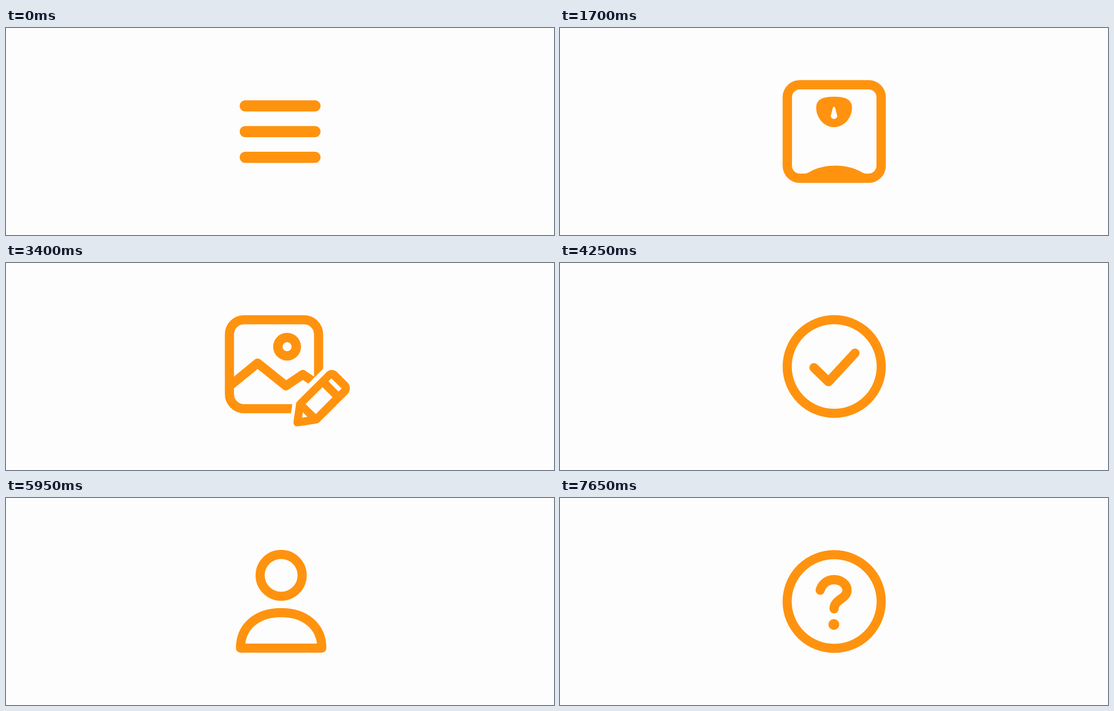
An HTML page with a canvas that plays this animation: 1200 px wide and 455 px high, repeating every 8000 ms.

```html
<!DOCTYPE html>
<html lang="en">
<head>
<meta charset="utf-8">
<title>Icons</title>
<style>
html, body { margin: 0; width: 100%; height: 100%; overflow: hidden; background: #fdfdfd; }
canvas { display: block; width: 1200px; height: 455px; }
</style>
</head>
<body>
<canvas id="stage" width="1200" height="455"></canvas>
<script>
const ctx = document.getElementById('stage').getContext('2d');
const INK = '#ff930f', PAPER = '#fdfdfd';
const STEP = 850, LOOP = 8000;

function line(d, width = 20, cap = 'round') {
  ctx.lineWidth = width;
  ctx.lineCap = cap;
  ctx.lineJoin = 'round';
  ctx.stroke(new Path2D(d));
}

function fill(d, color = INK) {
  ctx.fillStyle = color;
  ctx.fill(new Path2D(d));
}

function dot(x, y, r) {
  ctx.fillStyle = INK;
  ctx.beginPath();
  ctx.arc(x, y, r, 0, Math.PI * 2);
  ctx.fill();
}

function ring(x, y, r, width = 20) {
  ctx.lineWidth = width;
  ctx.beginPath();
  ctx.arc(x, y, r, 0, Math.PI * 2);
  ctx.stroke();
}

function frame(x, y, w, h, r, width = 20) {
  ctx.lineWidth = width;
  ctx.beginPath();
  ctx.roundRect(x, y, w, h, r);
  ctx.stroke();
}

function menu() {
  for (let i = 0; i < 3; i++) line(`M524 ${171.25 + i * 56.5}H676.5`, 24.5);
}

function hiddenEye() {
  line('M465 232C508 172 553 151 597.5 151S687 172 730 232C687 292 642 313 597.5 313S508 292 465 232Z');
  ring(597.5, 232, 34);
  line('M508 132L687 333');
}

function scale() {
  frame(497.75, 124.75, 205.5, 205.5, 27.5, 20.5);
  fill('M533 320.5Q541 320 547 316Q571 302.5 603 302.5T659 316Q665 320 673 320.5V325H533Z');
  fill('M600 151C590 151 582 152 576 154C566 157 561 165 561 175C561 198 579 218 600 218' +
       'S639.5 198 639.5 175C639.5 165 634 157 624 154C618 152 610 151 600 151Z');
  fill('M597.6 175Q600 171 602.4 175L607 193A7 7 0 1 1 593 193Z', PAPER);
}

function cross() {
  line('M523.5 151L674 301.5M674 151L523.5 301.5', 24);
}

function editImage() {
  frame(489.25, 124.75, 195.25, 195.5, 32);
  ring(615.5, 184, 20.25, 20.5);
  line('M489 271L551 220L613 270L650 245L684 268', 20, 'butt');
  fill('M705 222L628 299L627 310L622 345H705L765 260Z', PAPER);
  fill('M637 305L703 239Q712 231.5 723 238L749 264Q757 275 749 287L686 350Q683 352.5 679 353' +
       'L640 359Q628.5 360 629.5 349L635 311Q635.5 307 637 305Z');
  fill('M712.5 253.5L735 276L728 282.5L706 260Z', PAPER);
  fill('M693 273L715 295L678.5 332L656 310Z', PAPER);
  fill('M650 328L660 338L648.5 340Z', PAPER);
}

function check() {
  ring(600.5, 227.5, 103);
  line('M556 230L588 261L646 198');
}

function chevron() {
  line('M507.5 183.5L600.25 276L693 183.5', 24);
}

function person() {
  ring(602.5, 170, 46);
  line('M513.5 330C513.5 282 550 252 602.5 252S691.5 282 691.5 330Z');
}

function lock() {
  frame(513.5, 189.5, 177.5, 145, 32);
  line('M553.5 170V164A47 47 0 0 1 647.5 164V170', 20, 'butt');
  dot(602.3, 245, 13.2);
  line('M602.2 250V267', 16.5);
}

function help() {
  ring(600.4, 227.5, 103);
  line('M569.8 202.5C574 188 586 179.5 600 179.5C616 179.5 628.5 190 628.5 203' +
       'C628.5 212 622 217 615 222C608 227 600.2 233 600.2 243.5', 20.3);
  dot(599.7, 278, 11.8);
}

const icons = [menu, hiddenEye, scale, cross, editImage, check, chevron, person, lock, help];

function draw() {
  const t = performance.now() % LOOP;
  ctx.fillStyle = PAPER;
  ctx.fillRect(0, 0, 1200, 455);
  ctx.strokeStyle = INK;
  icons[Math.floor(t / STEP)]();
  requestAnimationFrame(draw);
}
draw();
</script>
</body>
</html>
```
